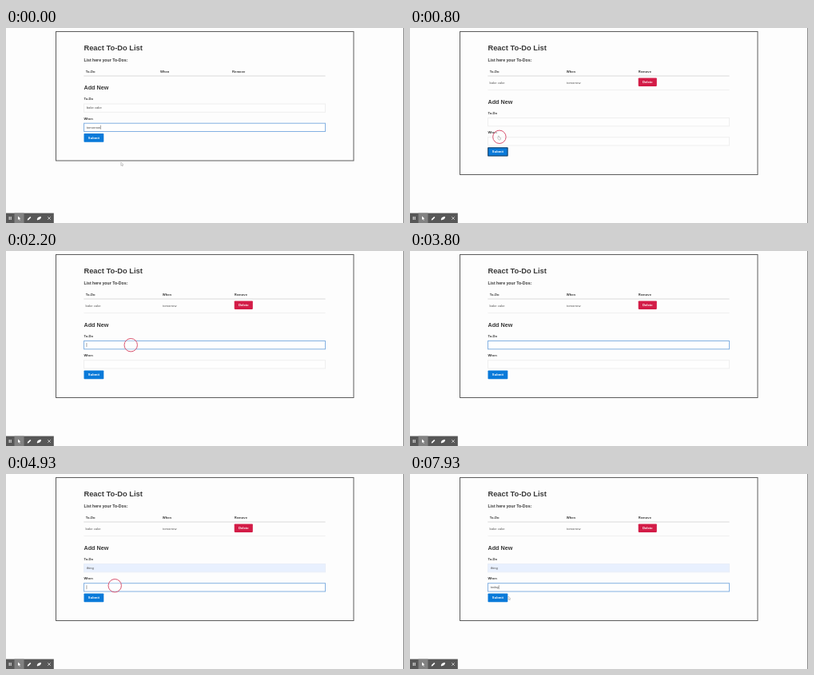
An HTML page with a canvas for the animation above (8000 ms loop, 498x244 px).

```html
<!DOCTYPE html>
<html lang="en">
<head>
<meta charset="utf-8">
<title>To-Do List</title>
<style>
html, body { margin: 0; width: 100%; height: 100%; overflow: hidden; background: #fdfdfd; }
canvas { display: block; }
</style>
</head>
<body>
<canvas id="stage" width="498" height="244"></canvas>
<script>
const ctx = document.getElementById('stage').getContext('2d');
const LOOP = 8000;
const STEP = 200 / 3;
const BASE = 4.15;
const LEFT = 97, RIGHT = 400;
const ADDED = 730, FOCUS_TODO = 2200, FILLED = 4330, PICKED = 4460, FOCUS_WHEN = 4930;

// Pointer paths: time, x, y
const path = [
  [0, 143.8, 168], [60, 141, 165], [260, 120, 144], [460, 110.5, 135], [1130, 110.5, 135],
  [1260, 117, 146], [1460, 117, 146], [1600, 155, 127], [2130, 155, 127]
];
const latePath = [[5330, 154, 148], [7800, 154, 148], [7930, 122.8, 153], [LOOP, 122.8, 153]];
const clicks = [[600, 930, 111.9, 136.3], [2200, 2400, 156.2, 117.7], [4860, 5060, 136.2, 139.7]];
const keys = [[5730, 't'], [6130, 'to'], [6400, 'tod'], [6860, 'toda'], [7130, 'today']];

function rect(x, y, w, h, color) {
  ctx.fillStyle = color;
  ctx.fillRect(x, y, w, h);
}

function frame(x, y, w, h, color, line = 1) {
  ctx.strokeStyle = color;
  ctx.lineWidth = line;
  ctx.strokeRect(x, y, w, h);
}

function round(x, y, w, h, color) {
  ctx.fillStyle = color;
  ctx.beginPath();
  ctx.roundRect(x, y, w, h, 0.8);
  ctx.fill();
}

// Lay text out large and scale down, so small sizes keep exact spacing
function text(str, x, y, size = BASE, weight = 'bold', color = '#383838', align = 'left') {
  ctx.save();
  ctx.translate(x, y);
  ctx.scale(0.1, 0.1);
  ctx.font = `${weight} ${size * 10}px "Liberation Sans", Arial, sans-serif`;
  ctx.textAlign = align;
  ctx.fillStyle = color;
  ctx.fillText(str, 0, 0);
  const width = ctx.measureText(str).width / 10;
  ctx.restore();
  return width;
}

function shape(points, fill, stroke, line = 0.6) {
  ctx.beginPath();
  points.forEach(([x, y]) => ctx.lineTo(x, y));
  ctx.closePath();
  ctx.fillStyle = fill;
  ctx.fill();
  if (stroke) {
    ctx.strokeStyle = stroke;
    ctx.lineWidth = line;
    ctx.stroke();
  }
}

function button(label, x, y, w, h, color) {
  round(x, y, w, h, color);
  text(label, x + w / 2, y + h / 2 + 1.4, BASE, 'bold', '#fff', 'center');
}

function field(y, value, { focus = false, filled = false, caret = false, caretStart = false }) {
  const edge = focus ? '#84b1e2' : filled ? '#e8eef8' : '#efefef';
  rect(LEFT + 0.5, y + 0.5, RIGHT - LEFT - 1, 10, filled ? '#e8f0fe' : '#fefefe');
  frame(LEFT + 0.5, y + 0.5, RIGHT - LEFT - 1, 10.3, edge);
  const width = text(value, 100.8, y + 6.8, BASE, 'normal', '#4a4a4a');
  if (caret) rect(100.7 + (caretStart ? 0 : width), y + 3, 0.5, 5, '#555');
}

function along(points, t) {
  if (t < points[0][0]) return null;
  for (let i = 1; i < points.length; i++) {
    const [t0, x0, y0] = points[i - 1];
    const [t1, x1, y1] = points[i];
    if (t <= t1) {
      const k = (t - t0) / (t1 - t0);
      return [x0 + (x1 - x0) * k, y0 + (y1 - y0) * k];
    }
  }
  return null;
}

function arrow(x, y) {
  shape([[x, y], [x, y + 4.3], [x + 1, y + 3.4], [x + 1.8, y + 4.9],
    [x + 2.4, y + 4.6], [x + 1.8, y + 3.1], [x + 3.1, y + 3]], '#fff', '#999', 0.5);
}

function hand(x, y) {
  shape([[x, y], [x + 0.8, y], [x + 1, y + 2], [x + 3, y + 2.5], [x + 3, y + 4],
    [x + 2.4, y + 5], [x + 0.6, y + 5], [x - 0.8, y + 3]], '#fff', '#999', 0.5);
}

function toolbar() {
  rect(0, 231.6, 59.8, 12.4, '#575757');
  rect(10.5, 231.6, 12, 12.4, '#828282');
  rect(3.7, 236, 0.9, 4, '#fff');
  rect(5.7, 236, 0.9, 4, '#fff');
  shape([[15, 235.5], [15, 240], [16.1, 239], [17, 240.8], [17.7, 240.4], [16.9, 238.7], [18.3, 238.6]], '#fff');
  shape([[26.7, 240.6], [27, 239.1], [30.2, 235.9], [31.4, 237.1], [28.2, 240.3]], '#fff');
  shape([[38.7, 239.3], [40, 237], [43.5, 235.7], [44, 237.2], [42.6, 239.2], [39.2, 240.6]], '#fff');
  ctx.strokeStyle = '#eee';
  ctx.lineWidth = 0.7;
  ctx.beginPath();
  ctx.moveTo(52.2, 236.2);
  ctx.lineTo(55.8, 239.8);
  ctx.moveTo(55.8, 236.2);
  ctx.lineTo(52.2, 239.8);
  ctx.stroke();
}

function table(added) {
  const shift = added ? 2.7 : 0;
  text('To-Do', 99.8, 56);
  text('When', 193.1 + shift, 56);
  text('Remove', 283.1 + shift, 56);
  rect(LEFT + 0.4, 59.5, RIGHT - LEFT - 0.8, 1, '#dadada');
  if (!added) return;
  text('bake cake', 99.6, 70.2, BASE, 'normal', '#555');
  text('tomorrow', 196.1, 70.2, BASE, 'normal', '#555');
  button('Delete', 285.7, 62.5, 23.1, 10.4, '#d31c47');
  rect(LEFT + 0.4, 77.1, RIGHT - LEFT - 0.8, 1, '#f0f0f0');
}

function form(t, added) {
  const dy = added ? 17.5 : 0;
  const top = added ? 112 : 94.5;
  const onTodo = t >= FOCUS_TODO && t < FOCUS_WHEN;
  const onWhen = t < 600 || t >= FOCUS_WHEN;
  const filled = t >= FILLED;
  const blink = since => Math.floor((t - since + 5) / 532) % 2 === 0;

  text('Add New', 97.4, 77.4 + dy, BASE * 1.75);
  text('To-Do', 97.4, 90.4 + dy);
  text('When', 97.4, 114.6 + dy);

  const todo = !added ? 'bake cake' : filled ? 'thing' : '';
  field(top, todo, {
    focus: onTodo, filled,
    caret: onTodo && blink(FOCUS_TODO),
    caretStart: t < PICKED
  });

  const key = keys.filter(k => k[0] <= t).pop();
  const when = !added ? 'tomorrow' : key ? key[1] : '';
  const caret = t < 5530 || (key && (t < 7330 || t >= 7860));
  field(top + 24.2, when, { focus: onWhen, caret: onWhen && caret });

  const hover = t >= 400 && t < ADDED;
  button('Submit', 97.5, 132 + dy, 24.8, 10.8, hover ? '#0669c1' : '#0a7ad9');
  if (t >= 600 && t < FOCUS_TODO) frame(97.7, 132.4 + dy, 24.4, 10.1, '#16324d', 0.9);
}

function pointer(t) {
  for (const [from, to, x, y] of clicks) {
    if (t < from || t >= to) continue;
    ctx.beginPath();
    ctx.arc(x, y, 8.2, 0, Math.PI * 2);
    ctx.fillStyle = 'rgba(255,255,255,0.3)';
    ctx.fill();
    ctx.strokeStyle = '#d8536f';
    ctx.lineWidth = 1;
    ctx.stroke();
  }
  const spot = along(path, t) || along(latePath, t);
  if (!spot) return;
  if (t >= 400 && t < 1130) hand(...spot);
  else arrow(...spot);
}

function draw(t) {
  const added = t >= ADDED;
  rect(0, 0, 498, 244, '#fdfdfd');
  rect(497, 0, 1, 244, '#8c8c8c');
  frame(62.5, 4.5, 372.5, added ? 179 : 161.5, '#5c5c5c');
  text('React To-Do List', 97.4, 27.8, BASE * 2.25);
  text('List here your To-Dos:', 97.4, 41.5, BASE * 1.25);
  table(added);
  form(t, added);
  toolbar();
  pointer(t);
}

const start = performance.now();
function tick() {
  const t = (performance.now() - start) % LOOP;
  draw(Math.floor((t + 8) / STEP) * STEP % LOOP);
  requestAnimationFrame(tick);
}
tick();
</script>
</body>
</html>
```
